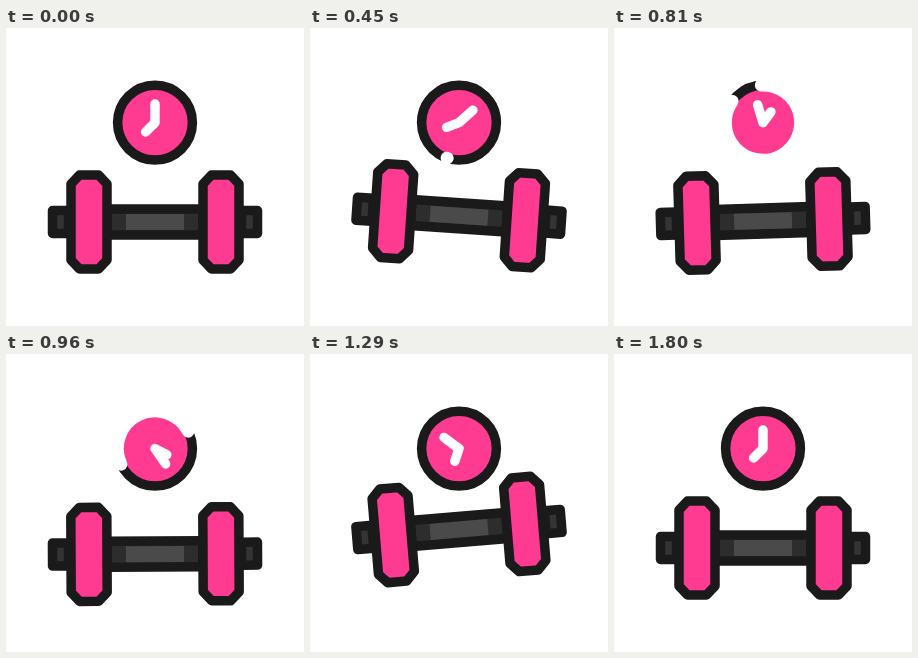
Animation of 298 by 298 pixels, one loop 1.98 s. Source, as an HTML page:

```html
<!DOCTYPE html>
<html lang="en">
<head>
<meta charset="utf-8">
<title>Workout time</title>
<style>
  html, body { margin: 0; width: 100%; height: 100%; overflow: hidden; background: #fff; }
  svg { display: block; width: 100vw; height: 100vh; }
  .line { stroke: #1a1a1a; stroke-width: 9.5; stroke-linejoin: round; }
  .pink { fill: #ff3b91; }
  .white { fill: none; stroke: #fff; stroke-linecap: round; stroke-linejoin: round; }
</style>
</head>
<body>
<svg viewBox="0 0 298 298">
  <defs>
    <path id="plate" class="line pink" d="M-9.5-47H9.5L18-38V38L9.5 47H-9.5L-18 38V-38Z"/>
    <rect id="knob" class="line" fill="#343434" x="-8" y="-11.5" width="16" height="23"/>
  </defs>
  <g id="dumbbell">
    <use href="#knob" x="-94.5"/>
    <use href="#knob" x="94.5"/>
    <rect class="line" fill="#2d2d2d" x="-48" y="-13" width="96" height="26"/>
    <rect fill="#4a4a4a" x="-29" y="-8" width="58" height="16"/>
    <use href="#plate" x="-66"/>
    <use href="#plate" x="66"/>
  </g>
  <g transform="translate(149 94.6)">
    <circle class="line pink" r="37.4"/>
    <path id="sweep" class="white" stroke-width="12.4"/>
    <path id="hands" class="white" stroke-width="9.5"/>
  </g>
</svg>
<script>
const LOOP = 1980, STEP = 30, START = 90, END = 1800;
const el = id => document.getElementById(id);

// [ms, offset y, tilt]
const LIFT = [
  [60, 0, 0], [240, 13, 1], [450, -6.3, 3.9], [555, -10, -1], [660, -5, -5.2],
  [810, -1, -1.7], [1080, 9.5, 0.2], [1140, 6, -1], [1290, -18.5, -4.8],
  [1380, -19, -2], [1560, -5, 0.5], [1710, 0, 0]
];
// [ms, tail angle, head angle]
const SWEEP = [
  [420, 107, 107], [450, 108, 109], [660, 149, 348],
  [810, 267, 575], [1080, 712, 752], [1140, 766, 766]
];

// Monotone cubic through the rows, held flat at both ends
function track(rows, col, t) {
  const last = rows.length - 1;
  if (t <= rows[0][0]) return rows[0][col];
  if (t >= rows[last][0]) return rows[last][col];
  const i = rows.findIndex(r => r[0] > t) - 1;
  const slope = k => (rows[k + 1][col] - rows[k][col]) / (rows[k + 1][0] - rows[k][0]);
  const tangent = k => {
    if (k === 0 || k === last) return 0;
    const a = slope(k - 1), b = slope(k);
    return a * b <= 0 ? 0 : 2 * a * b / (a + b);
  };
  const w = rows[i + 1][0] - rows[i][0], s = (t - rows[i][0]) / w, q = 1 - s;
  return rows[i][col] * (1 + 2 * s) * q * q + rows[i + 1][col] * s * s * (3 - 2 * s)
    + w * (tangent(i) * s * q * q - tangent(i + 1) * s * s * q);
}

// cubic-bezier(.57, 0, .24, 1)
function ease(x) {
  if (x <= 0) return 0;
  if (x >= 1) return 1;
  let lo = 0, hi = 1;
  for (let i = 0; i < 24; i++) {
    const s = (lo + hi) / 2, q = 1 - s;
    if (3 * s * q * q * 0.57 + 3 * s * s * q * 0.24 + s * s * s < x) lo = s; else hi = s;
  }
  return lo * lo * (3 - 2 * lo);
}

// Angle in degrees, clockwise from the right
function polar(r, deg) {
  const a = deg * Math.PI / 180;
  return (r * Math.cos(a)).toFixed(3) + " " + (r * Math.sin(a)).toFixed(3);
}

function arc(from, to) {
  const r = 37.4, mid = (from + to) / 2;
  return `M${polar(r, from)}A${r} ${r} 0 0 1 ${polar(r, mid)}A${r} ${r} 0 0 1 ${polar(r, to)}`;
}

function draw(t) {
  const y = 194 + track(LIFT, 1, t);
  el("dumbbell").setAttribute("transform", `translate(149 ${y}) rotate(${track(LIFT, 2, t)})`);

  const turn = 360 * ease((t - START) / (END - START));
  el("hands").setAttribute("d", `M${polar(18.6, 2 * turn - 90)}L0 0L${polar(13.3, turn + 135)}`);

  const shown = t >= 420 && t < 1140;
  el("sweep").setAttribute("d", shown ? arc(track(SWEEP, 1, t), track(SWEEP, 2, t) + 0.1) : "");
}

const origin = performance.now();
function tick() {
  const t = (performance.now() - origin) % LOOP;
  draw(Math.floor(t / STEP) * STEP);
  requestAnimationFrame(tick);
}
draw(0);
requestAnimationFrame(tick);
</script>
</body>
</html>
```
